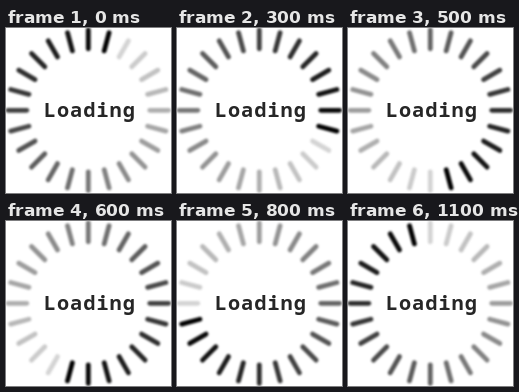
These frames come from a looping animation (165x165 px, 1.2 s). An HTML page:

```html
<!DOCTYPE html>
<html>
<head>
<meta charset="utf-8">
<style>
  html, body { margin: 0; width: 100%; height: 100%; overflow: hidden; background: #fff; }
  svg { display: block; width: 165px; height: 165px; }
  #spokes { stroke-width: 4.8; stroke-linecap: round; filter: blur(.9px); }
  text { font: 600 20.2px "Noto Sans Mono", "DejaVu Sans Mono", monospace; letter-spacing: 1.05px; fill: #262626; }
</style>
</head>
<body>
<svg viewBox="0 0 165 165">
  <g id="spokes"></g>
  <text x="37.8" y="89.3">Loading</text>
</svg>
<script>
const COUNT = 24, STEPS = 12, STEP_MS = 100, CENTER = 82.3;
const group = document.getElementById('spokes');

const spokes = Array.from({ length: COUNT }, (_, i) => {
  const line = document.createElementNS('http://www.w3.org/2000/svg', 'line');
  const attrs = { x1: CENTER, x2: CENTER, y1: CENTER - 61.5, y2: CENTER - 80.3,
    transform: `rotate(${i * 360 / COUNT} ${CENTER} ${CENTER})` };
  for (const name in attrs) line.setAttribute(name, attrs[name]);
  return group.appendChild(line);
});

// The black head advances two spokes per step; the trail fades to light grey.
function draw(now) {
  const head = 1 + 2 * (Math.floor(now / STEP_MS) % STEPS);
  spokes.forEach((line, i) => {
    const age = (head - i + COUNT) % COUNT;
    const grey = Math.round(212 * age / (COUNT - 1));
    line.style.stroke = `rgb(${grey}, ${grey}, ${grey})`;
  });
}

const start = performance.now();
function tick() {
  draw(performance.now() - start);
  requestAnimationFrame(tick);
}
tick();
</script>
</body>
</html>
```
